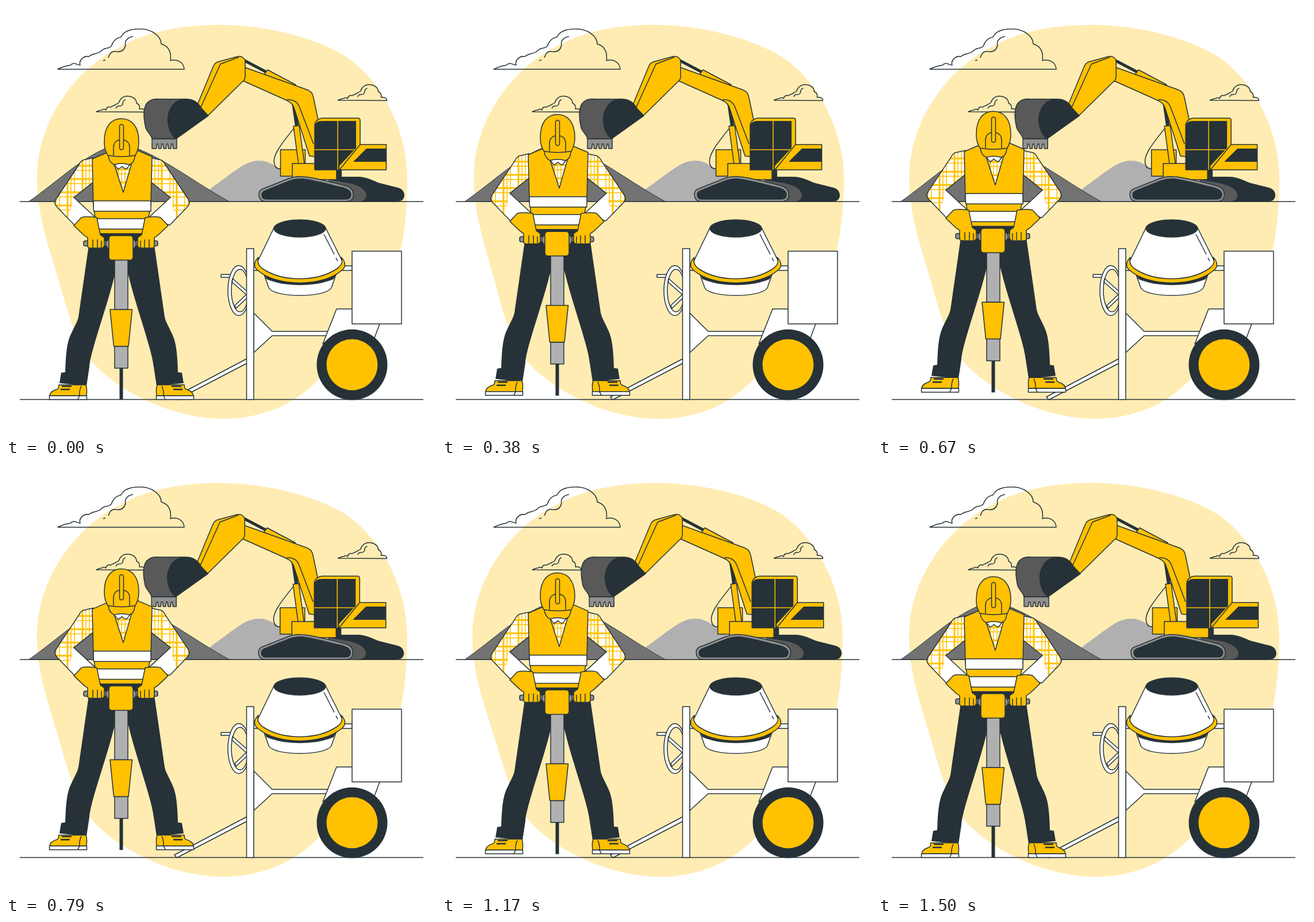
An HTML page with a canvas that plays this animation: 748 px wide and 748 px high, repeating every 1540 ms.

```html
<!DOCTYPE html>
<html>
<head>
<meta charset="utf-8">
<title>Construction site</title>
<style>
html, body { margin: 0; width: 100%; height: 100%; overflow: hidden; background: #fff; }
canvas { display: block; width: 748px; height: 748px; }
</style>
</head>
<body>
<canvas id="stage"></canvas>
<script>
const SIZE = 748, LOOP = 1540, STEP = 1000 / 24, CYCLE = 36;
const INK = '#263238', YELLOW = '#ffc100', CREAM = '#ffecb3', WHITE = '#fff';
const LIGHT = '#b0b0b0', MID = '#919191', STONE = '#737373', DARK = '#595959';

const canvas = document.getElementById('stage');
const ctx = canvas.getContext('2d');
const ratio = window.devicePixelRatio || 1;
canvas.width = canvas.height = Math.round(SIZE * ratio);

function fill(d, color) {
  ctx.fillStyle = color;
  ctx.fill(new Path2D(d));
}
function line(d, width = 1.5, color = INK) {
  ctx.strokeStyle = color;
  ctx.lineWidth = width;
  ctx.stroke(new Path2D(d));
}
function shape(d, color) {
  fill(d, color);
  line(d);
}
function box(x, y, w, h, color, radius = 0) {
  const p = new Path2D();
  p.roundRect(x, y, w, h, radius);
  ctx.fillStyle = color;
  ctx.fill(p);
  ctx.strokeStyle = INK;
  ctx.lineWidth = 1.5;
  ctx.stroke(p);
}
function oval(x, y, rx, ry, color, outlined = false) {
  ctx.beginPath();
  ctx.ellipse(x, y, rx, ry, 0, 0, Math.PI * 2);
  if (color) { ctx.fillStyle = color; ctx.fill(); }
  if (outlined) { ctx.strokeStyle = INK; ctx.lineWidth = 1.5; ctx.stroke(); }
}
function group(draw, dx = 0, dy = 0) {
  ctx.save();
  ctx.translate(dx, dy);
  draw();
  ctx.restore();
}
// Draws a part twice, the second time mirrored about the vertical line x = axis.
function mirrored(draw, axis) {
  draw();
  ctx.save();
  ctx.translate(axis * 2, 0);
  ctx.scale(-1, 1);
  draw();
  ctx.restore();
}

function blob(angle) {
  ctx.save();
  ctx.translate(376, 376);
  ctx.rotate(angle * Math.PI / 180);
  ctx.translate(-376, -376);
  fill('M360 33C440 31 530 52 585 84C652 125 698 215 698 300C698 345 694 390 686 428' +
    'C672 480 600 555 572 610C540 670 470 718 378 718C300 718 210 680 158 628' +
    'C122 592 107 530 91 475C71 408 54 360 54 300C54 200 120 110 200 70C250 42 310 34 360 33Z', CREAM);
  ctx.restore();
}

function clouds() {
  line('M90 110C98 106 105 104 112 103C118 97 122 102 129 103C126 94 136 86 144 88' +
    'C150 82 160 84 166 78C170 72 178 75 183 70C186 62 190 56 200 54C205 43 218 40 232 40' +
    'C252 39 270 52 270 66C284 70 288 82 286 95C296 92 309 96 310 110Z');
  line('M221 53C210 55 206 62 208 68C206 77 200 81 190 79C182 78 180 85 178 90M169 95L173 94');
  const small = () => {
    line('M157 184C161 182 164 181 167 181C169 178 172 180 174 181C174 176 179 175 182 176' +
      'C185 173 189 174 191 171C194 170 197 169 198 164C202 158 208 156 214 157C222 158 227 163 227 169' +
      'C232 171 233 175 232 179C237 178 242 180 242 184.500Z');
    line('M208 163C204 164 203 168 203 171C201 175 198 174 195 174C192 175 192 177 191 178');
  };
  group(small);
  group(small, 420.5, -20);
}

function landscape() {
  fill('M325 340L362 313C395 290 415 270 438 269C460 268 470 282 490 290L520 340Z', LIGHT);
  fill('M40 340C90 305 130 265 175 247Q200 238 226 247C280 268 330 308 388 340Z', STONE);
  line('M40 340C90 305 130 265 175 247Q200 238 226 247C280 268 330 308 388 340', 1);
  line('M24 340.300H726M24 684.500H726');
}

function excavator() {
  // tracks and base
  fill('M560 297H612C628 297 638 304 650 308L682 316C690 318 693 324 693 330C692 337 688 340 680 340H580Z', INK);
  fill('M560 302L596 308C615 312 627 320 627 330Q626 340 612 340H580Z', DARK);
  fill('M575 284H584V298H575Z', INK);
  line('M503 210C482 236 462 260 467 275C469 284 476 284 480 282');
  box(477.5, 250, 43, 46, YELLOW);

  // boom with its cylinders
  fill('M497 168L503 210L509 208L506 180Z', INK);
  line('M415 95L453 115', 5);
  shape('M455 111L504 137L498 142L449 119Z', YELLOW);
  shape('M416 107L522 145C530 147 534 153 535 160L544 203L538 262L528 261L502 180C500 171 495 167 488 164L412 130Z', YELLOW);
  line('M489 163C502 162 508 168 511 177L535 240');
  shape('M500 209L510 208L519 274L509 276Z', YELLOW);
  shape('M498 274H575V302H498Z', YELLOW);
  shape('M332 174L361 104C363 100 366 98 369 97L402 88C410 86 416 91 416 97V122C416 127 414 130 411 132L351 191Z', YELLOW);
  line('M338 178L373 101L405 89');

  // bucket
  let comb = 'M254 231H297V248';
  for (let i = 0; i < 4; i++) {
    const x = 291 - i * 8.5;
    comb += `L${x} 248L${x - 1} 240H${x - 3}L${x - 4} 248`;
  }
  shape(comb + 'H254Z', MID);
  shape('M243 212C238 190 238 168 254 163C260 161 265 162 270 162H312C292 166 280 182 282 200C283 215 288 225 296 231H254C253 224 246 220 243 212Z', DARK);
  shape('M312 162C328 161 336 171 340 178L352 191L296 231C285 222 280 205 282 192C285 172 298 162 312 162Z', INK);

  // cab
  shape('M537 206C539 199 545 195 551 195H612Q616 195 616 199V241H661.500V285H537Z', YELLOW);
  fill('M537 209Q538 200 550 200H609V247L580 278V285H537Z', INK);
  line('M577 200V285M537 250H606', 1.5, YELLOW);
  line('M616 241L580 285');
  fill('M627 248H661.500V271H604Z', INK);

  // near track
  shape('M440 327C440 320 446 318 452 316L492 300C500 297 510 296 518 297C535 298 560 305 588 312C600 315 604 320 604 328C604 336 600 340 592 340H452C444 340 440 335 440 327Z', MID);
  shape('M445 328C445 323 450 321 454 320L494 304C502 301 510 300 518 301C535 303 560 310 586 316C596 319 600 323 600 328Q600 336 591 336H453Q445 336 445 328Z', INK);
}

function mixer() {
  // stand
  shape('M420 613L293 680L297 685L420 621Z', WHITE);
  shape('M431 534L463 566H565V573.500H463L431 603Z', WHITE);
  box(374, 467, 18, 5, WHITE);
  ctx.beginPath();
  ctx.ellipse(405, 495, 19, 43.5, 0, 0, Math.PI * 2);
  ctx.ellipse(407, 495, 15, 37, 0, 0, Math.PI * 2);
  ctx.fillStyle = WHITE;
  ctx.fill('evenodd');
  shape('M394 474L419 496V503L393 480Z', WHITE);
  shape('M398 521L419 501V508L400 526Z', WHITE);
  oval(405, 495, 19, 43.5, null, true);
  oval(407, 495, 15, 37, null, true);
  box(431, 452, 10, 8, WHITE);
  box(582, 452, 20, 8, WHITE);
  box(418.5, 422, 12.5, 262.5, WHITE);

  // motor and wheel
  shape('M575 527H604V572H570L551 588Z', WHITE);
  fill('M570 553H650L640 580H570Z', WHITE);
  line('M650 553L640 580');
  box(602, 426.5, 86, 126.5, WHITE);
  oval(602, 624, 61.5, 61.5, INK);
  oval(602, 624, 44.5, 44.5, YELLOW);

  // drum
  shape('M447 462L457 490C465 508 557 508 566 490L576 462Z', WHITE);
  fill('M449 466L453 475C485 489 538 489 570 475L574 466Z', INK);
  shape('M466 386L438 444C438 486 584 486 585 444L556 386Z', WHITE);
  shape('M439 437C430 446 431 455 438 460C472 489 550 489 584 460C591 455 592 446 583 437C587 447 582 453 574 458C540 480 482 480 448 458C440 453 436 447 439 437Z', YELLOW);
  oval(511, 387, 45, 15, INK, true);
  line('M553 397L571 432M574 438L577 444');
}

// Crossed pairs of a thick and a thin stripe.
function plaid(region, x0, y0) {
  ctx.save();
  ctx.clip(new Path2D(region));
  for (let i = 0; i < 6; i++) {
    const x = x0 + i * 26, y = y0 + i * 23;
    line(`M${x} 240V390M60 ${y}H350`, 3, YELLOW);
    line(`M${x + 6} 240V390M${x + 12} 240V390M60 ${y + 8}H350`, 1.5, YELLOW);
  }
  ctx.restore();
}

function leg() {
  fill('M201 392H160L144 416L126 541C124 552 111 570 108 585Q104 600 103 637L96 638L93 656L140 661L145 628C147 600 177 520 189 468L201 462Z', INK);
  shape('M92 659H139C142 668 140 674 140 678H76C76 672 82 669 88 667C93 665 91 662 92 659Z', YELLOW);
  box(75.5, 678, 65, 6.5, WHITE);
  line('M97 661.500H114M95 667H111', 2.5);
  line('M131 661Q127 670 128 678L125 684');
}

function arm() {
  const sleeve = 'M152 264L134 268Q130 270 127 276L87 336Q82 344 90 351L119 381L158 370L118 333L152 306Z';
  fill(sleeve, WHITE);
  ctx.save();
  ctx.clip(new Path2D('M155 250H60V368H109L118 333H155Z'));
  plaid(sleeve, 81, 278);
  ctx.restore();
  line(sleeve);
}

function glove() {
  shape('M118 382L131 368C140 365 150 367 158 368L164 398L171 403V417Q170 421 166 421H146Q142 421 142 417V403L136 399Z', YELLOW);
  line('M151 406V420M159 406V420M166 408V420');
}

function worker() {
  mirrored(leg, 201);
  mirrored(arm, 202);

  // vest
  shape('M178 254L150 266L152 345L155 368L163 396H243L248 368L252 345L254 262L226 250Z', YELLOW);
  shape('M152 339H252V357H152.500Z', WHITE);
  shape('M156 370H248L244 388H160Z', WHITE);
  const neck = 'M187 272L204 324L219 272Z';
  fill(neck, WHITE);
  plaid(neck, 195, 284);
  line(neck);
  shape('M186 273L195 284L202 279Q206 284 210 283L218 273Z', WHITE);

  // helmet
  shape('M171 236C171 208 184 196 201 196C219 196 231 210 231 236C231 250 227 255 224 262C223 271 219 275 214 276Q201 272 188 276C182 273 179 268 178 261C173 253 171 247 171 236Z', YELLOW);
  line('M178 260Q201 264 224 260M187 260V246C187 239 191 234 198 233M204 233C211 234 215 239 215 246V260');
  box(197.5, 206, 7, 44, YELLOW, 3.5);

  // jackhammer
  box(135, 408.5, 129, 9, MID, 3);
  oval(200, 414, 26.5, 14, MID, true);
  box(189, 440, 23, 88, LIGHT);
  box(189, 592, 23, 38, LIGHT);
  shape('M181 528H219.500L213 592H187.500Z', YELLOW);
  box(179, 399.5, 42, 42.5, YELLOW, 5);
  fill('M197.500 630H203.500V685H197.500Z', INK);
  mirrored(glove, 200);
}

// Each tenth of the cycle the excavator jerks to the next offset.
const SHAKE = [0, -1.5, 2.4, -1.85, 1.43, -3, 1.43, -2.25, 2.4, -1.5, 0];
function shake(phase) {
  const i = Math.min(9, Math.floor(phase * 10));
  const eased = 1 - Math.pow(1 - (phase * 10 - i), 2.2);
  return SHAKE[i] + (SHAKE[i + 1] - SHAKE[i]) * eased;
}
function sway(phase) {
  const p = (phase + 0.25) % 1;
  return 1 - Math.abs(p - 0.5) * 4;
}
function lift(phase) {
  return -14.4 * (1 - Math.abs(phase * 2 - 1));
}

function render(time) {
  const frame = Math.floor((time % LOOP + 5) / STEP);
  const phase = (frame % CYCLE) / CYCLE;
  ctx.setTransform(ratio, 0, 0, ratio, 0, 0);
  ctx.lineJoin = 'round';
  ctx.fillStyle = WHITE;
  ctx.fillRect(0, 0, SIZE, SIZE);
  // sway() peaks half a cycle around its centre
  blob(sway(phase));
  clouds();
  landscape();
  group(excavator, shake(phase));
  mixer();
  group(worker, 0, lift(phase));
}

let start;
function tick(now) {
  if (start === undefined) start = now;
  render(now - start);
  requestAnimationFrame(tick);
}
render(0);
requestAnimationFrame(tick);
</script>
</body>
</html>
```
